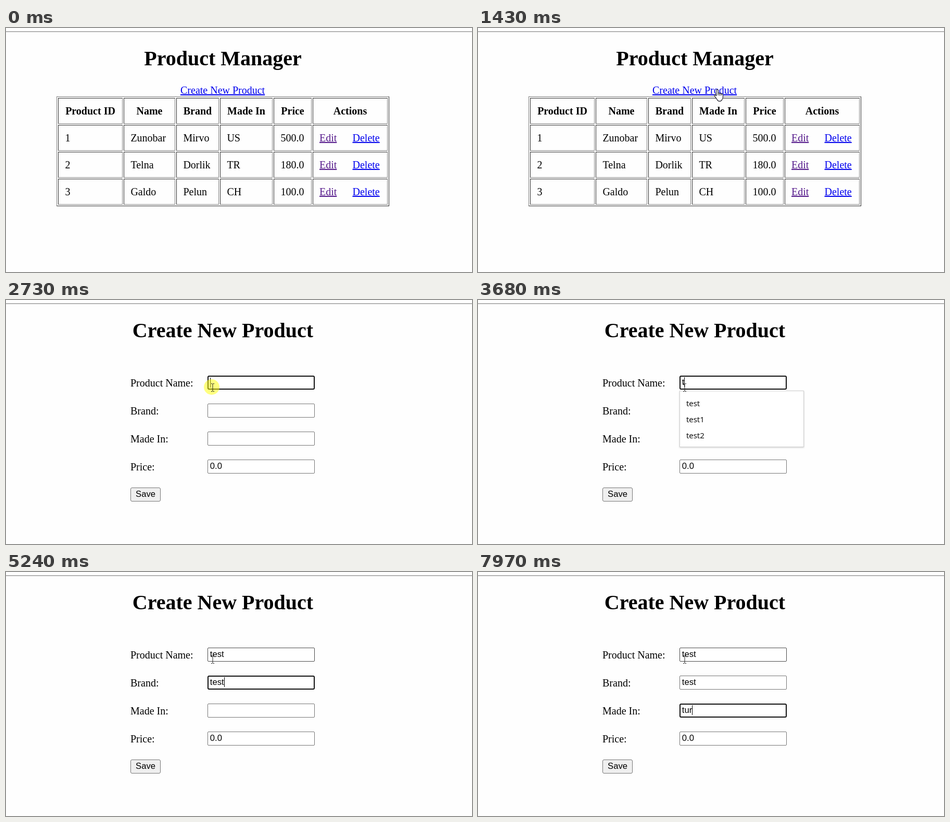
Write an HTML page that moves like this. It is 895 px wide and 471 px high and loops after 8 s.

```html
<!DOCTYPE html>
<html lang="en">
<head>
<meta charset="utf-8">
<title>Product Manager</title>
<style>
html, body { margin: 0; width: 100%; height: 100%; overflow: hidden; background: #fefefe; }
#stage { position: relative; width: 895px; height: 471px; overflow: hidden;
  font: 20px/23px "Liberation Serif", "Times New Roman", serif; color: #000; }
#stage * { box-sizing: border-box; }
#stage div, #stage svg { position: absolute; white-space: pre; }
.rule { left: 0; top: 6px; width: 895px; height: 2px; background: #b3b3b3; }
.title { left: 0; top: 36px; width: 833px; text-align: center; font-size: 40px; line-height: 46px; font-weight: bold; }
.table { border: 1px outset gray; }
.cell { border: 1px inset gray; }
.head { font-weight: bold; text-align: center; }
.link { color: #00e; text-decoration: underline; }
.visited { color: #551a8b; }
.field { border: 1px solid #767676; border-radius: 2px; background: #fff; }
.field.hover { border-color: #4a4a4a; }
.field.focus { border: 2px solid #101010; border-radius: 3px; }
.sans { font: 16.667px/19px "Liberation Sans", Arial, sans-serif; }
.button { border: 1px solid #767676; border-radius: 3px; background: #efefef; text-align: center; padding-top: 2px; }
.popup { border: 1px solid #d0d0d0; background: #fff; box-shadow: 0 1px 3px rgba(0, 0, 0, .2); }
.popup div { left: 12px; font: 15px/30px "Open Sans", sans-serif; }
.caret { width: 1px; height: 19px; background: #000; }
.click { width: 30px; height: 30px; border-radius: 50%; background: rgba(255, 255, 0, .5); }
svg { left: 0; top: 0; overflow: visible; }
</style>
</head>
<body>
<div id="stage">
  <div class="rule"></div>
  <div id="list"></div>
  <div id="form"></div>
  <div id="popup" class="popup"></div>
  <div id="caret" class="caret"></div>
  <div id="click" class="click"></div>
  <svg id="arrow" width="12" height="19"><path d="M.5.5V15.6L4 12.3L6.4 18.2L8.9 17.1L6.5 11.4H11.3Z" fill="#fff" stroke="#000"/></svg>
  <svg id="hand" width="18" height="24"><g fill="#fff" stroke="#10101c" stroke-width="1.1" stroke-linejoin="round">
    <path d="M4.7 2.6Q4.7.6 6.4.6T8.1 2.6V7.6Q9.6 6.6 11 8.2Q12.6 7.4 14 9Q17.4 8.6 17.4 11.6V15.5Q17.4 18 15.8 20Q14.6 23.4 11 23.4Q7.8 23.4 6.4 20.5Q5.2 18.5 3.4 16.2Q1 13 .8 12Q1 10.4 2.8 11L4.7 12.8Z"/>
    <path d="M8.1 7.6V12M11 8.2V12.4M14 9V12.6" fill="none"/></g></svg>
  <svg id="beam" width="8" height="16"><path d="M1 .5H3L4 1.5L5 .5H7M4 1.5V14.5M1 15.5H3L4 14.5L5 15.5H7" fill="none" stroke="#222"/></svg>
</div>
<script>
const LOOP = 8000;
const $ = id => document.getElementById(id);

function add(parent, cls, text, x, y, w, h) {
  const el = document.createElement("div");
  el.className = cls;
  el.textContent = text;
  if (x !== undefined) Object.assign(el.style, { left: x + "px", top: y + "px" });
  if (w) el.style.width = w + "px";
  if (h) el.style.height = h + "px";
  parent.appendChild(el);
  return el;
}

// Product list page
const list = $("list");
add(list, "title", "Product Manager");
const createLink = add(list, "link", "Create New Product", 335, 109);
add(list, "table", "", 97, 132, 639, 212);
const cols = [[100, 224], [226, 325], [327, 409], [411, 512], [514, 587], [589, 733]];
const rows = [
  ["Product ID", "Name", "Brand", "Made In", "Price", "Actions"],
  ["1", "Zunobar", "Mirvo", "US", "500.0"],
  ["2", "Telna", "Dorlik", "TR", "180.0"],
  ["3", "Galdo", "Pelun", "CH", "100.0"]
];
rows.forEach((row, r) => {
  const y = 135 + 52 * r;
  cols.forEach(([left, right], c) => {
    add(list, "cell", "", left, y, right - left, 50);
    if (!r) add(list, "head", row[c], left, y + 14, right - left);
    else if (c < 5) add(list, "", row[c], left + 13.4, y + 14);
  });
  if (r) {
    add(list, "link visited", "Edit", 602, y + 14);
    add(list, "link", "Delete", 665.5, y + 14);
  }
});

// Form page
const form = $("form");
const fieldTop = i => 146 + 54 * i;
add(form, "title", "Create New Product");
const fields = ["Product Name:", "Brand:", "Made In:", "Price:"].map((label, i) => {
  const y = fieldTop(i);
  add(form, "", label, 239, y + 3);
  return {
    box: add(form, "field", "", 387, y, 206, 27),
    text: add(form, "sans", i === 3 ? "0.0" : "", 391.75, y + 3)
  };
});
add(form, "sans button", "Save", 239, 362, 58, 27);

// Suggestion list
const popup = $("popup");
Object.assign(popup.style, { left: "387px", top: "175px", width: "239px" });
const words = ["test", "test1", "test2", "phone", "laptop", "tablet", "camera", "mouse", "printer"];
const wordEls = words.map((w, i) => add(popup, "", w, 12, 8 + 31 * i));

// Each step changes part of the state and holds until the next
const steps = [[0, { page: "list", cursor: null, typed: ["", "", ""], focus: -1, caret: 0, shown: 0 }]];
for (let i = 0; i < 9; i++) {
  const q = 1 - (1 - i / 8) ** 2;
  steps.push([340 + 78.75 * i, {
    cursor: [i < 7 ? "arrow" : "hand", Math.round(764 - 305 * q), Math.round(392 - 274 * q)]
  }]);
}
steps.push(
  [1190, { click: [459, 118], active: true }],
  [1430, { click: null, active: false }],
  [1580, { page: "form" }],
  [1960, { cursor: ["arrow", 453, 124] }],
  [2040, { cursor: ["arrow", 439, 135] }],
  [2120, { cursor: ["arrow", 427, 144] }],
  [2430, { cursor: ["beam", 405, 161], hover: true }],
  [2500, { cursor: ["beam", 397, 169] }],
  [2730, { click: [395, 168], focus: 0, caret: 392 }],
  [2820, { shown: 9 }],
  [2960, { click: null }],
  [3280, { caret: 0 }],
  [3600, { typed: ["t", "", ""], caret: 396 }],
  [3675, { shown: 3 }],
  [3750, { typed: ["te", "", ""], caret: 405 }],
  [3920, { typed: ["tes", "", ""], caret: 414 }],
  [4070, { typed: ["test", "", ""], caret: 419 }],
  [4390, { focus: 1, caret: 392, shown: 0 }],
  [4850, { typed: ["test", "t", ""], caret: 396 }],
  [5000, { typed: ["test", "te", ""], caret: 405 }],
  [5090, { typed: ["test", "tes", ""], caret: 414 }],
  [5240, { typed: ["test", "test", ""], caret: 419 }],
  [5790, { focus: 2, caret: 392 }],
  [6420, { caret: 0 }],
  [6800, { typed: ["test", "test", "t"], caret: 396 }],
  [7350, { caret: 0 }],
  [7500, { typed: ["test", "test", ""] }],
  [7670, { typed: ["test", "test", "t"], caret: 396 }],
  [7820, { typed: ["test", "test", "tu"], caret: 405 }],
  [7970, { typed: ["test", "test", "tur"], caret: 411 }]
);
let merged = {};
const states = steps.map(([at, change]) => (merged = { ...merged, ...change, at }));

const hot = { arrow: [0, 0], hand: [6, 0], beam: [4, 8] };
const show = (el, on) => { el.style.display = on ? "block" : "none"; };
function place(el, x, y) {
  el.style.left = x + "px";
  el.style.top = y + "px";
}

function draw(s) {
  show(list, s.page === "list");
  show(form, s.page === "form");
  createLink.style.color = s.active ? "#f00" : "";
  fields.forEach((f, i) => {
    if (i < 3) f.text.textContent = s.typed[i];
    f.box.classList.toggle("focus", s.focus === i);
    f.box.classList.toggle("hover", !!s.hover && i === 0);
  });
  show(popup, s.shown);
  popup.style.height = 16 + 31 * s.shown + "px";
  wordEls.forEach((el, i) => show(el, i < s.shown));
  show($("caret"), s.caret);
  if (s.caret) place($("caret"), s.caret, fieldTop(s.focus) + (s.typed[s.focus] ? 3 : 4));
  show($("click"), s.click);
  if (s.click) place($("click"), s.click[0] - 15, s.click[1] - 15);
  for (const id in hot) {
    const on = s.cursor && s.cursor[0] === id;
    show($(id), on);
    if (on) place($(id), s.cursor[1] - hot[id][0], s.cursor[2] - hot[id][1]);
  }
}

let last = null;
const start = performance.now();
function tick() {
  const t = (performance.now() - start) % LOOP;
  let now = states[0];
  for (const s of states) if (s.at <= t) now = s;
  if (now !== last) draw(last = now);
  requestAnimationFrame(tick);
}
tick();
</script>
</body>
</html>
```
